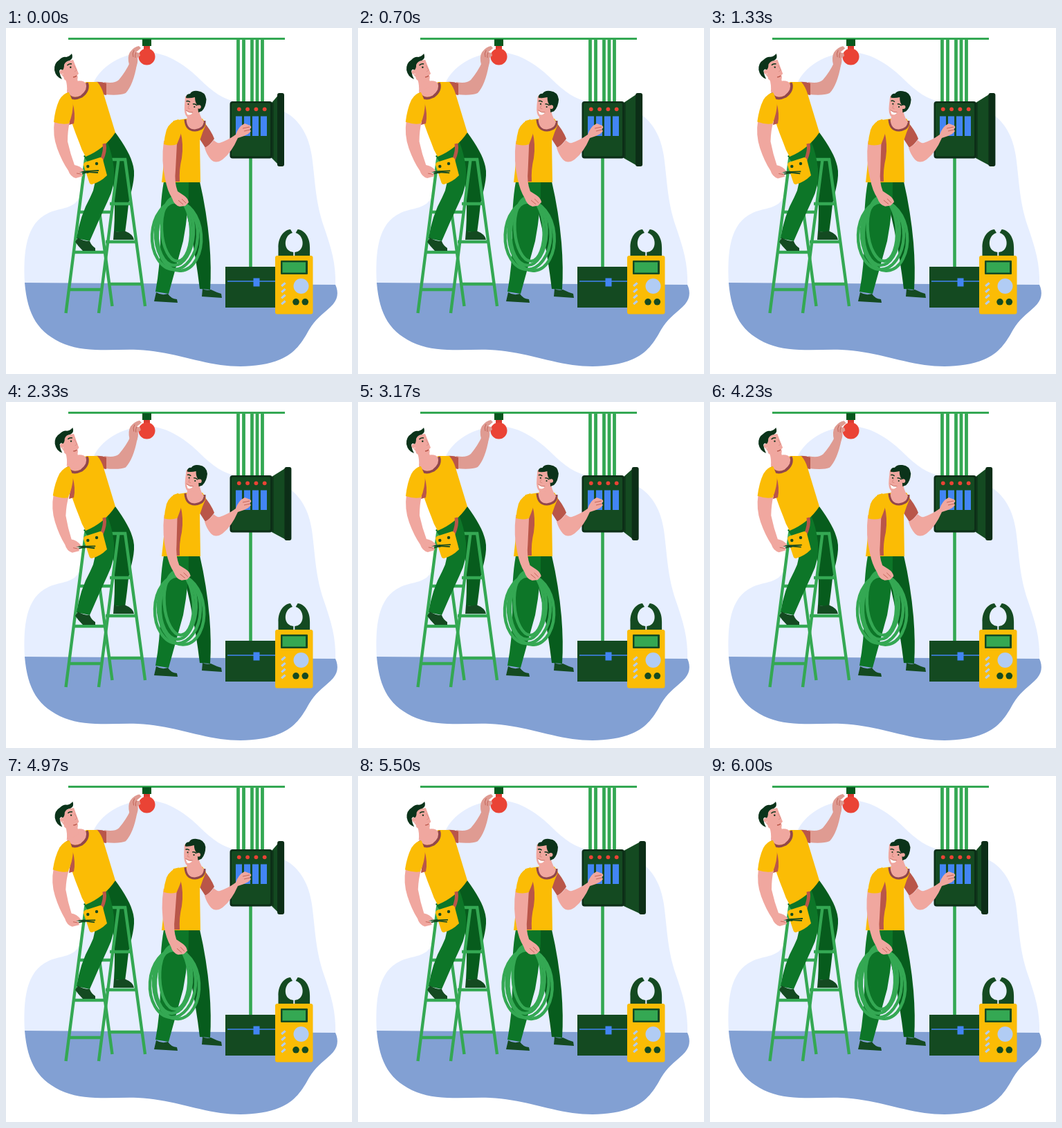
These frames come from a looping animation (500 px wide and 500 px high, 6.06 s). An HTML page with a canvas:

```html
<!DOCTYPE html>
<html lang="en">
<head>
<meta charset="utf-8">
<title>Electricians at work</title>
<style>
html,body{margin:0;width:100%;height:100%;overflow:hidden;background:#fff}
canvas{display:block;width:100vmin;height:100vmin}
</style>
</head>
<body>
<canvas id="stage"></canvas>
<script>
const LOOP = 6060, SPAN = 6000;
const canvas = document.getElementById('stage');
const ctx = canvas.getContext('2d');
const C = {
  sky: '#e6eeff', floor: '#82a0d3', green: '#34a853', dark: '#144a21', edge: '#0c2e17',
  leg: '#0d7628', legBack: '#075c1d', yellow: '#fbbc05', skin: '#f0a79f', skinBack: '#df9b92',
  shade: '#b95649', collar: '#91474b', red: '#ea4335', blue: '#4285f4', dial: '#b1ccf4', hair: '#0b331a'
};

const fill = (d, color) => { ctx.fillStyle = color; ctx.fill(new Path2D(d)); };
const line = (d, color, w, cap = 'butt') => {
  ctx.strokeStyle = color;
  ctx.lineWidth = w;
  ctx.lineCap = cap;
  ctx.lineJoin = 'round';
  ctx.stroke(new Path2D(d));
};
const box = (x, y, w, h, color, r = 0) => {
  ctx.fillStyle = color;
  ctx.beginPath();
  ctx.roundRect(x, y, w, h, r);
  ctx.fill();
};
const dot = (x, y, r, color) => {
  ctx.fillStyle = color;
  ctx.beginPath();
  ctx.arc(x, y, r, 0, Math.PI * 2);
  ctx.fill();
};
const ring = (x, y, rx, ry, turn, color, w) => {
  ctx.strokeStyle = color;
  ctx.lineWidth = w;
  ctx.beginPath();
  ctx.ellipse(x, y, rx, ry, turn, 0, Math.PI * 2);
  ctx.stroke();
};
const swing = (x, y, angle, draw) => {
  ctx.save();
  ctx.translate(x, y);
  ctx.rotate(angle);
  ctx.translate(-x, -y);
  draw();
  ctx.restore();
};

// Eased value at time t through [time, value] keys
function track(keys, t) {
  for (let i = 1; i < keys.length; i++) {
    const [t0, a] = keys[i - 1], [t1, b] = keys[i];
    if (t <= t1) return a + (b - a) * (1 - Math.cos(Math.PI * (t - t0) / (t1 - t0))) / 2;
  }
  return keys[keys.length - 1][1];
}
const PULL = [[0, 0], [700, -.8], [1230, -1.3], [1450, -4.6], [1970, -5], [2330, -4.9], [3000, 0]];
const SWAY = [[0, 0], [1330, 3], [2330, 4], [3170, 1], [4230, 2], [4970, -3], [6000, 0]];
const TWIST = [[0, 0], [1330, .3], [2330, 1.2], [3170, 0], [4230, 2], [4970, .8], [6000, 0]];

function backdrop() {
  fill('M27 368C25 325 28 282 62 267C80 259 99 262 107 243L116 190L126 80C136 57 165 36 205 35C235 36 262 56 280 74C298 92 315 104 335 107C360 108 382 108 402 121C426 133 438 158 442 185C447 222 447 250 459 286C470 318 477 340 476 371Z', C.sky);
  fill('M27 368L476 371C481 382 480 393 469 403C457 414 447 421 438 436C428 454 418 470 396 479C372 489 340 491 310 487C270 481 235 467 190 465C155 464 115 469 85 457C46 441 31 415 27 368Z', C.floor);
}

function wiring() {
  box(90, 14, 313, 3, C.green);
  for (const x of [335.5, 343.5, 355.5, 363, 370.5]) box(x - 2.4, 16, 4.8, 93, C.green);
  box(351.2, 186, 4.6, 162, C.green);
}

function panel(open) {
  const x = 392 + open;
  fill(`M384 108L${x + 4} 94V200L384 188Z`, C.dark);
  box(x, 94, 10, 106, C.edge, 3);
  line('M386 108V188', C.edge, 1.2);
  box(323.5, 106, 61.5, 82.5, C.edge, 4);
  box(326, 108.5, 56, 77, C.dark, 2);
  for (let i = 0; i < 4; i++) {
    dot(336.8 + i * 12.3, 117.3, 2.9, C.red);
    box(332 + i * 12, 127.5, 9, 28.5, C.blue);
  }
}

function tools() {
  box(317, 345, 72, 59, C.dark);
  line('M320 366H389', C.blue, 1.6);
  box(357.5, 361.5, 9, 12, C.blue);
  const jaw = () => fill('M393.5 330V318C393 303 401 292 411 291L414 296C403 299 401 315 408 321Q411 324 415.3 324V330Z', C.dark);
  jaw();
  ctx.save();
  ctx.translate(832.6, 0);
  ctx.scale(-1, 1);
  jaw();
  ctx.restore();
  box(389, 329, 54.5, 84.5, C.yellow, 3);
  box(397, 336, 39, 20, C.dark, 1);
  box(399.5, 338.5, 33.5, 15, C.green);
  dot(426.5, 373, 11, C.dial);
  dot(419, 395.8, 4.8, C.dark);
  dot(432.3, 395.8, 4.8, C.dark);
  for (let i = 0; i < 4; i++) line(`M398.2 ${373 + i * 8.7}l5.4 -4.6`, C.dial, 3.2);
}

function ladder() {
  line('M130 228L153.5 402M172 189L201 402M150 254H181M144 309H189M149 370H198', C.green, 4.4);
  line('M115 190L86.5 412M162.5 190L134 412M113 190H174M105 266H151M98 324H145M91 378H138', C.green, 4.4);
}

function bulb() {
  box(197, 16, 13, 10, '#07571d');
  box(199, 26, 9, 8, '#d93c30');
  dot(203.5, 41.5, 12, C.red);
}

function climberLegs() {
  fill('M140 160L158 151C172 170 181 186 184 200C188 217 180 237 177 255Q175 274 172 296L156 294Q158 262 156 235L148 188Z', C.legBack);
  fill('M156 293Q163 296 171 293Q184 298 185 306H155Z', C.dark);
  ladder();
  fill('M112 185L146 164Q153 179 156 203Q158 229 147 250Q133 280 121 308L102 304Q107 271 122 244Q132 225 127 207Z', C.leg);
  fill('M104 303Q111 308 121 308Q123 314 129 318V322H111Q104 315 100 309Z', C.dark);
}

function climber(pull, twist) {
  climberLegs();
  swing(145, 88, twist / 70, () => {
    fill('M142 78Q156 81 163 75Q173 63 179 50L189 53Q184 82 173 94Q164 98 143 96Z', C.skinBack);
    fill('M178 53Q175 42 179 35Q185 27 192 26L195 29L188 35L193 36L194 40L190 43Q191 50 188 56Z', C.skinBack);
    line('M185 32Q182 37 184 42M188 35Q186 39 187 43', C.shade, .8);
  });
  fill('M128 78Q137 77 145 80L145 97Q136 96 130 92Z', C.shade);
  fill('M88 96Q103 84 116 78L132 78Q138 85 141 95L158 151Q142 175 115 186Q109 176 106 166Q95 139 91 122Z', C.yellow);
  fill('M96 107Q101 124 98 138L91 140Z', C.shade);
  ctx.fillStyle = C.skin;
  ctx.beginPath();
  ctx.ellipse(103, 88, 15, 11, -.42, 0, 7);
  ctx.fill();
  line('M88 94Q95 106 109 99Q121 90 117 79', C.collar, 3.6);
  swing(97, 82, -pull * .006, climberHead);

  line('M142 167Q144 178 138 191', C.shade, 5);
  fill('M114 194L136 187Q139 187 140 190L146 213Q136 223 124 226Q121 226 120 222L112 198Q112 195 114 194Z', C.yellow);
  dot(118.3, 200, 2.2, C.dark);
  dot(131, 196, 2.2, C.dark);
  swing(85, 110, -pull / 100, () => {
    line('M105 208L119 207L134 206M108 211L119 208L133 209', C.dark, 1.8);
    dot(118, 208, 2, C.dark);
    fill('M70 134Q67 155 74 174Q81 193 90 206Q93 215 101 217L111 214L110 210L106 209L113 206Q107 199 99 198Q93 182 89 164Q89 148 92 136Z', C.skin);
    line('M102 210L109 211', C.shade, .8);
    fill('M91 93Q83 94 77 104Q71 117 69 136Q81 140 91 138Q97 124 97 107Z', C.yellow);
  });
}

function climberHead() {
  fill('M79 66L86 74Q89 83 88 93L105 84L103 73Z', C.skin);
  fill('M80 54Q87 47 97 46L101 56L105 66L103 68Q105 74 101 76Q91 80 84 74Z', C.skin);
  fill('M81 74Q72 71 70 61Q69 51 77 46Q82 41 87 42Q92 41 95 37Q98 44 92 47Q86 48 84 53Q84 60 81 61Q79 58 77 62Q78 69 81 74Z', C.hair);
  dot(80.5, 63.5, 3, C.skin);
  dot(93.3, 56.7, 1.2, C.edge);
  line('M88.5 54Q91 51 95 52', C.hair, 1.5);
  line('M97 71Q100 71 102 69', C.shade, 1.3);
  line('M98 54L102 61L99 63', '#d68880', .8);
}

function fitterHead() {
  fill('M263 124L278 114Q279 126 286 136Q272 149 261 133Z', C.skin);
  fill('M259 99Q266 94 276 100L281 111Q279 123 274 128Q268 132 262 129Q257 125 258 112Z', C.skin);
  fill('M260 101Q260 95 266 95Q269 90 277 91Q288 92 289.5 103Q289 114 283 120L278 122L277 112Q273 108 273 100Q266 102 260 101Z', C.hair);
  dot(279, 114, 2.8, C.skin);
  dot(263.5, 110, 1.1, C.edge);
  dot(272.3, 114, 1.1, C.edge);
  line('M260.5 106Q263 104.5 266 107M270 110Q273 109 276 112', C.hair, 1.5);
  line('M265 110L263 116L266 117', '#d68880', .9);
  fill('M260 119Q265 123 270 122Q267 127 262 125Z', '#fff');
  line('M260 119Q265 123 270 122', C.shade, .8);
}

function fitter(sway) {
  fill('M260 222H280Q290 265 294 310Q297 347 295 378L280 377Q275 335 266 290L258 255Z', C.legBack);
  fill('M284 377Q290 380 296 378Q304 382 311 384L312 390L283 388Z', C.dark);
  fill('M228 222H264Q265 260 256 308L235 384L216 381Q223 343 223 304Q222 255 228 222Z', C.leg);
  fill('M217 382Q225 387 234 384Q238 391 247 392L248 397L214 395Z', C.dark);
  fill('M285 135Q296 147 301 160Q295 169 288 173L279 159Z', C.shade);
  fill('M287 173Q296 169 300 162Q305 167 309 166Q321 162 332 154Q336 142 345 138L353 141Q356 144 352 146L354 149L350 153L344 156L335 159Q326 180 313 190Q303 197 296 190Q290 183 287 173Z', C.skin);
  line('M342 145L352 143M344 149L353 147', C.shade, .8);
  fill('M242 134L261 131H284L289 139Q284 150 280 163L281 223H225Q229 188 231 157Z', C.yellow);
  fill('M252 149Q257 168 254 188Q250 204 251 222H242L241 167Z', C.shade);
  ctx.fillStyle = C.skin;
  ctx.beginPath();
  ctx.ellipse(273, 138, 13, 10, .08, 0, 7);
  ctx.fill();
  line('M259 132Q260 148 273 148Q288 146 287 134', C.collar, 3);
  swing(273, 134, sway * .012, fitterHead);

  swing(240, 146, -sway / 155, () => {
    ring(244, 300, 33, 49, .05, C.green, 4.4);
    ring(249, 301, 33, 50, -.08, C.green, 4.4);
    ring(245, 296, 26, 47, .06, C.green, 4.4);
    ring(246, 291, 21, 46, -.05, C.green, 4.4);
    fill('M228 163Q224 193 230 218Q233 235 240 246Q243 256 251 258L259 257L264 252Q263 246 257 242L248 236Q243 223 245 205L247 167Z', C.skin);
    line('M249 249L256 255M254 247L260 253', C.shade, .8);
    fill('M249 132Q237 135 232 147Q229 157 228 168Q238 171 247 168Q254 152 256 140Z', C.yellow);
  });
}

function render(t) {
  const door = 7 * (1 - Math.cos(t / 1000 * Math.PI * 2));
  ctx.fillStyle = '#fff';
  ctx.fillRect(0, 0, 500, 500);
  backdrop();
  wiring();
  panel(door);
  tools();
  bulb();
  climber(track(PULL, t % 3000), track(TWIST, t));
  fitter(track(SWAY, t));
}

function resize() {
  const size = Math.min(innerWidth, innerHeight) || 500;
  const px = Math.round(size * (devicePixelRatio || 1));
  canvas.width = canvas.height = px;
  ctx.setTransform(px / 500, 0, 0, px / 500, 0, 0);
}

const start = performance.now();
function tick() {
  const t = (performance.now() - start) % LOOP;
  render(Math.min(t, SPAN));
  requestAnimationFrame(tick);
}
addEventListener('resize', resize);
resize();
tick();
</script>
</body>
</html>
```
